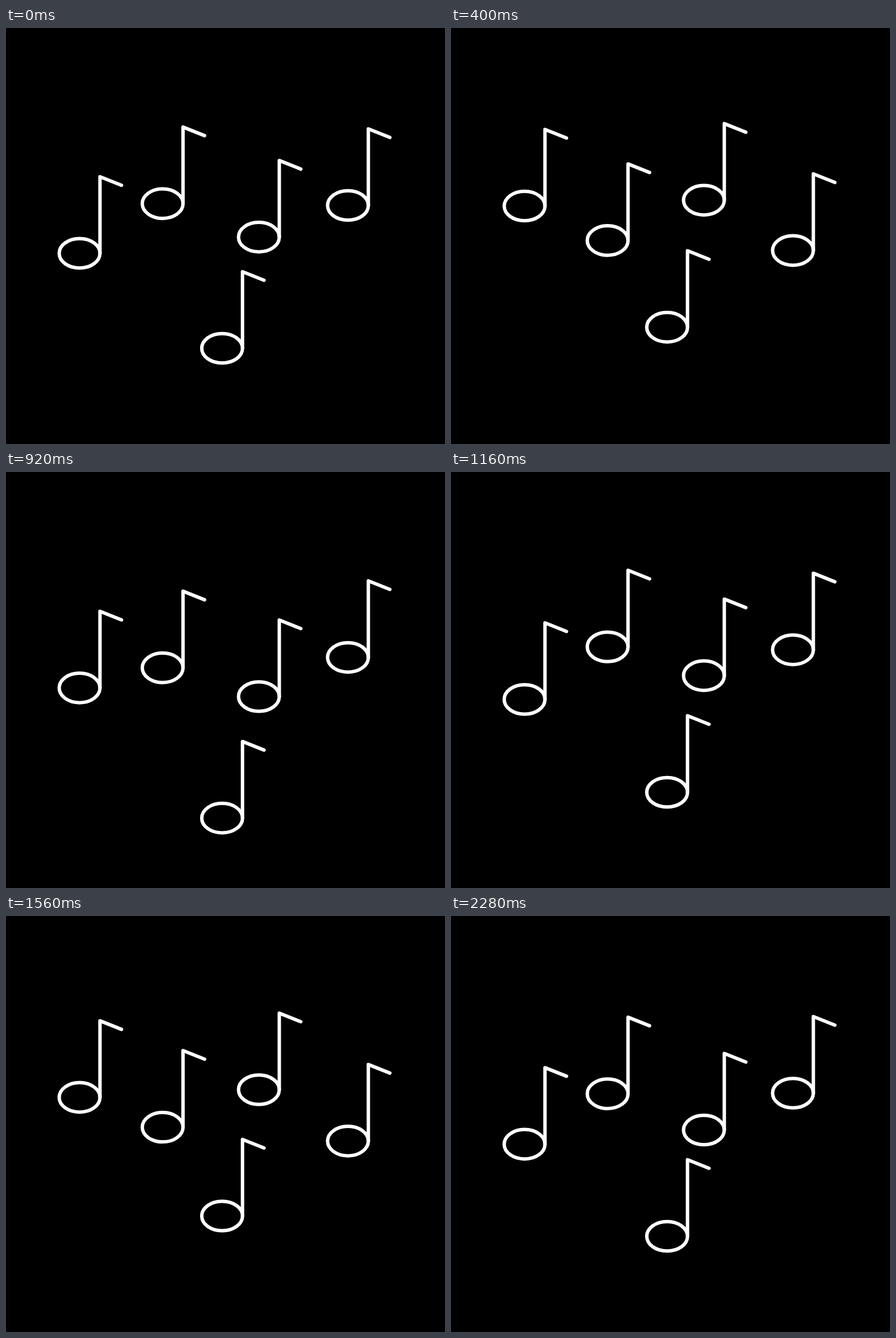
Recreate the animation shown at these times as an HTML page. Size 769 by 728 pixels, loop 2.32 s.

```html
<!DOCTYPE html>
<html lang="en">
<head>
<meta charset="utf-8">
<title>Bouncing notes</title>
<style>
  html, body { margin: 0; width: 100%; height: 100%; overflow: hidden; background: #000; }
  svg { display: block; width: 769px; height: 728px; }
  path, ellipse { fill: none; stroke: #fff; stroke-width: 6; stroke-linecap: round; stroke-linejoin: round; }
</style>
</head>
<body>
<svg viewBox="0 0 769 728">
  <defs>
    <g id="note">
      <ellipse cx="-35.7" cy="134" rx="35.7" ry="25.8"/>
      <path d="M0 134V0L37.7 15"/>
    </g>
  </defs>
</svg>
<script>
const STEP = 40, LOOP = 2320, TRAVEL = 93;

// x: stem, top: highest stem tip, keys: steps at which the note turns,
// low: whether the first turn is at the bottom of its travel
const notes = [
  { x: 164.6, top: 172.4, low: true, keys: [-2, 12, 28, 42, 57, 72] },
  { x: 310.1, top: 172, low: true, keys: [-13, 1, 15, 29, 45, 59] },
  { x: 478.7, top: 166, low: true, keys: [-5, 9, 23, 37, 53, 67] },
  { x: 634.7, top: 172, low: false, keys: [-2, 13, 27, 41, 55, 71] },
  { x: 414.3, top: 380, low: true, keys: [-7, 7, 22, 36, 50, 64] }
];

const svg = document.querySelector('svg');
for (const note of notes) {
  note.el = document.createElementNS(svg.namespaceURI, 'use');
  note.el.setAttribute('href', '#note');
  svg.append(note.el);
}

const ease = u => u * u * (3 - 2 * u);

function noteY({ top, low, keys }, step) {
  const i = keys.findIndex(k => k > step) - 1;
  const e = ease((step - keys[i]) / (keys[i + 1] - keys[i]));
  const falling = (i % 2 === 0) !== low;
  return top + TRAVEL * (falling ? e : 1 - e);
}

function draw(ms) {
  const step = Math.floor((ms % LOOP) / STEP);
  for (const note of notes) {
    note.el.setAttribute('transform', `translate(${note.x} ${noteY(note, step).toFixed(2)})`);
  }
}

let start;
function tick(now) {
  start ??= now;
  draw(now - start);
  requestAnimationFrame(tick);
}
draw(0);
requestAnimationFrame(tick);
</script>
</body>
</html>
```
